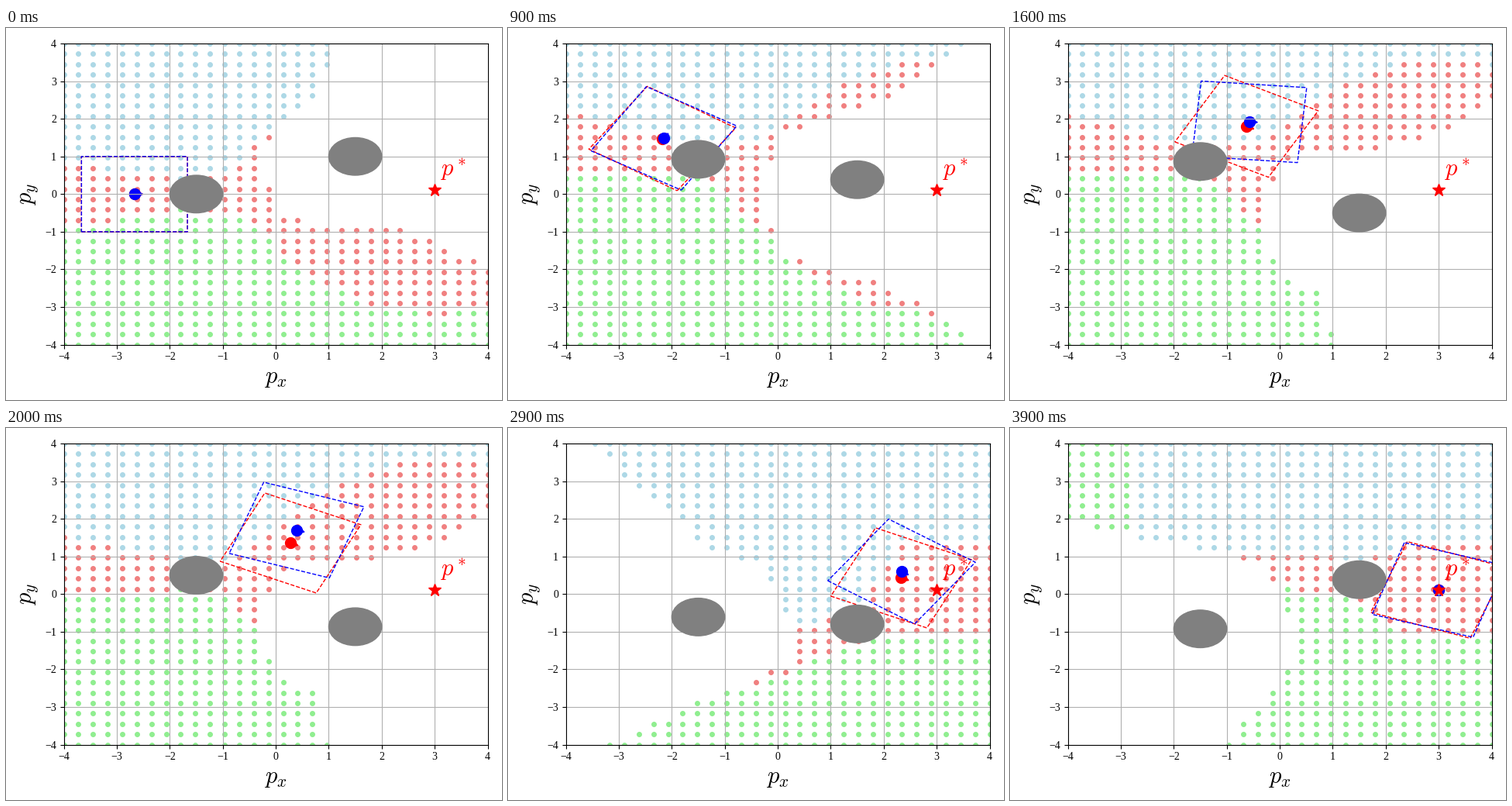
A matplotlib script that plays this animation: 640x480 px, repeating every 4000 ms.

```python
import numpy as np
import matplotlib.pyplot as plt
from matplotlib.animation import FuncAnimation
from matplotlib.patches import Circle, Polygon

plt.rcParams.update({
    "font.family": "Liberation Serif",
    "font.size": 10,
    "mathtext.fontset": "cm",
})

FRAMES, INTERVAL = 40, 100
W, H, DPI = 640, 480, 100
GOAL = (3, 0.1)
ARRIVE = 33   # from here on the robots only turn on the spot
SWITCH = 26   # the regions jump from the left obstacle to the right one

axis = np.linspace(-4, 4, 30)
gx, gy = np.meshgrid(axis, axis)

# Waypoints: frame, x, y, heading in degrees
BLUE_PATH = [(0, -2.667, 0, 0), (9, -2.15, 1.48, 58.5), (16, -.575, 1.92, -5),
             (24, 1.3, 1.29, -30), (29, 2.337, .6, -35), (33, 3, .11, -43.5)]
RED_PATH = [(0, -2.667, 0, 0), (9, -2.18, 1.476, 56.5), (16, -.627, 1.8, -28),
            (24, 1.195, .935, -25), (29, 2.33, .43, -25), (33, 3, .11, -34)]


def obstacle_heights(i):
    phase = np.pi * i / 24
    return np.sin(phase), np.cos(phase)


def left_regions(i):
    """Limits around the left obstacle: gap top, gap bottom, blue, green."""
    height, speed = obstacle_heights(i)
    shadow = GOAL[1] + (height - GOAL[1]) * (3 - gx) / 4.5
    half = .35 + .22 * abs(gx + 1.7)
    arch = .2 * (gx - 3)**2
    blue = np.maximum(shadow + half, 3.6 - arch)
    green = np.minimum(shadow - half, arch - 3.2)

    def wing(v):
        rise = 1.8 * (1 - np.exp(-np.maximum(0, gx + .3) / .27))
        slope = 3 * max(v, 0)**2 * np.maximum(0, gx - .7)
        return .8 * v - .2 + rise + slope + .2 * np.maximum(0, gx - 1.5)**2

    top = np.where(gx > -.3, wing(speed), -9)
    return top, -wing(.8 * height - speed), blue, green


def right_regions(i):
    """The same limits around the right obstacle."""
    height = obstacle_heights(i)[1]
    near_goal = np.clip((gx - 1.5) / .8, 0, 1)
    shadow = GOAL[1] + (height - GOAL[1]) * (3 - gx) / 1.5 * (1 - near_goal)
    half = .5 + .65 * near_goal + .2 * np.minimum(gx, 0)
    top = 1.1 - 2.4 * np.exp(-np.maximum(0, .25 - gx) / .35)
    top += .45 * np.exp(-1.25 * height) * np.maximum(0, -1.2 - gx)
    bottom = -1.85 - (1.5 + 1.1 * height) * (.14 - gx)
    return np.where(gx < .25, top, -9), bottom, shadow + half, shadow - half


def classify(i):
    regions = left_regions if i < SWITCH else right_regions
    top, bottom, blue, green = regions(i)
    shown = (gy >= top) | (gy <= bottom)
    # a green front enters from the left while the robots turn
    front = np.interp(i, [ARRIVE, FRAMES - 1], [-4.6, -2.75])
    is_green = (gy < green) | (gx < front)
    is_blue = (gy > blue) & ~is_green
    return shown & is_blue, shown & is_green, shown & ~is_blue & ~is_green


def unit(angle):
    return np.array([np.cos(angle), np.sin(angle)])


def pace(i):
    return min(.23, .04 + .02 * i, .05 * (ARRIVE + 1 - i))


def pose(path, turn, i):
    """Position on a cubic path and heading along its tangent."""
    if i >= ARRIVE:
        _, x, y, angle = path[-1]
        return np.array([x, y]), np.radians(angle + turn * (i - ARRIVE))
    k = max(n for n in range(len(path) - 1) if path[n][0] <= i)
    f0, x0, y0, a0 = path[k]
    f1, x1, y1, a1 = path[k + 1]
    span = f1 - f0
    u = (i - f0) / span
    p, q = np.array([x0, y0]), np.array([x1, y1])
    v = pace(f0) * span * unit(np.radians(a0))
    w = pace(f1) * span * unit(np.radians(a1))
    pos = (p * (2*u**3 - 3*u**2 + 1) + v * (u**3 - 2*u**2 + u)
           + q * (3*u**2 - 2*u**3) + w * (u**3 - u**2))
    vel = (6*(u - u**2) * (q - p) + v * (3*u**2 - 4*u + 1)
           + w * (3*u**2 - 2*u))
    return pos, np.arctan2(vel[1], vel[0])


fig = plt.figure(figsize=(W / DPI, H / DPI), dpi=DPI)
ax = fig.add_axes([74.6 / W, 71.4 / H, 546.95 / W, 388.6 / H])
ax.set(xlim=(-4, 4), ylim=(-4, 4))
ax.set_xticks(range(-4, 5))
ax.set_yticks(range(-4, 5))
ax.grid(True)
ax.set_xlabel("$p_x$", fontsize=22)
ax.set_ylabel("$p_y$", fontsize=22)

dots = [ax.plot([], [], "o", color=c, ms=4, zorder=1)[0]
        for c in ("lightblue", "lightgreen", "lightcoral")]
obstacles = [ax.add_patch(Circle((x, 0), 0.5, color="gray", lw=1, zorder=5))
             for x in (-1.5, 1.5)]
ax.plot(*GOAL, "r*", ms=12, zorder=6)
ax.text(3.1, 0.5, "$p^*$", color="red", fontsize=22, zorder=6)


class Robot:
    """Body and nose lie below the grid, the dashed box above it."""

    def __init__(self, color, path, turn, z):
        self.path, self.turn = path, turn
        self.box, = ax.plot([], [], "--", color=color, lw=1, snap=False,
                            zorder=2 + z)
        self.body, = ax.plot([], [], "o", color=color, ms=10, zorder=1 + z)
        self.nose = ax.add_patch(Polygon(np.zeros((3, 2)), color=color, lw=1,
                                         joinstyle="miter", zorder=1 + z))

    def update(self, i):
        pos, a = pose(self.path, self.turn, i)
        ahead, side = unit(a), unit(a + np.pi / 2)
        corners = [pos + sx * ahead + sy * side for sx, sy in
                   ((-1, -1), (1, -1), (1, 1), (-1, 1), (-1, -1))]
        self.box.set_data(*np.transpose(corners))
        self.body.set_data([pos[0]], [pos[1]])
        self.nose.set_xy([pos + .1 * side, pos + .155 * ahead,
                          pos - .1 * side])


robots = [Robot("red", RED_PATH, -12.7, .1),
          Robot("blue", BLUE_PATH, -10.7, .2)]


def draw(i):
    for line, mask in zip(dots, classify(i)):
        line.set_data(gx[mask], gy[mask])
    for obstacle, x, y in zip(obstacles, (-1.5, 1.5), obstacle_heights(i)):
        obstacle.center = (x, y)
    for robot in robots:
        robot.update(i)
    return []


anim = FuncAnimation(fig, draw, frames=FRAMES, interval=INTERVAL,
                     repeat=True, repeat_delay=0, blit=False)
plt.show()
```
